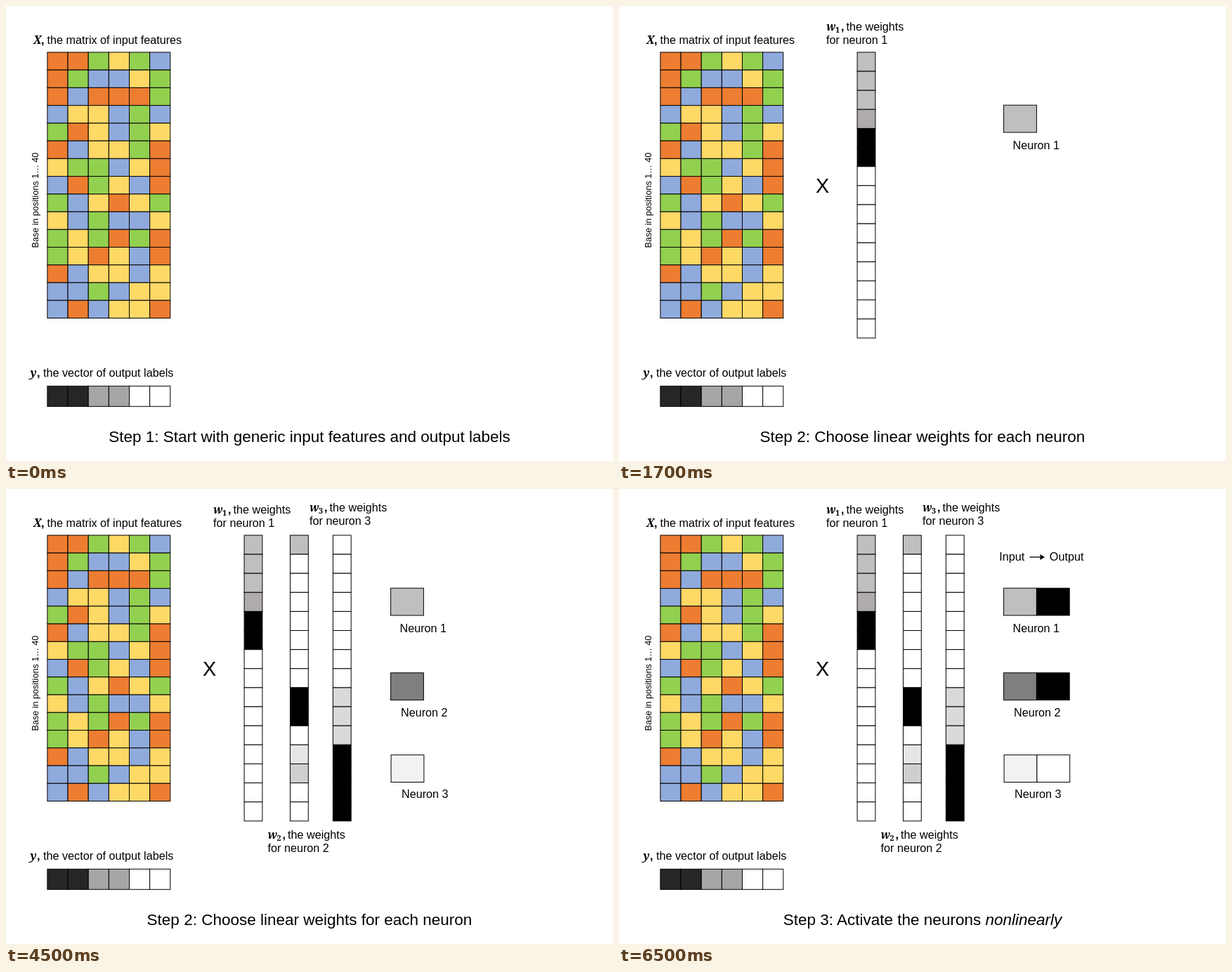
An HTML page for the animation above (8000 ms loop, 864 px wide and 648 px high).

```html
<!DOCTYPE html>
<html lang="en">
<head>
<meta charset="utf-8">
<title>Neuron weights, step by step</title>
<style>
html, body { margin: 0; width: 100%; height: 100%; overflow: hidden; background: #fff; }
svg { display: block; width: 864px; height: 648px; }
text { font: 16.2px "Liberation Sans", Arial, sans-serif; white-space: pre; }
rect { stroke: #000; }
.var { font: italic bold 15.5px "Noto Serif", serif; }
.sub { font: bold 11px "Noto Serif", serif; }
.bold { font-weight: bold; }
.side { font-size: 12.6px; }
.times { font-size: 28.8px; }
.step { font-size: 22.5px; text-anchor: middle; }
</style>
</head>
<body>
<svg id="stage" viewBox="0 0 864 648"></svg>
<script>
const LOOP = 8000;
const stage = document.getElementById('stage');
const scenes = [];
let layer;

function add(tag, attrs, parent = layer) {
  const el = document.createElementNS('http://www.w3.org/2000/svg', tag);
  for (const key in attrs) el.setAttribute(key, attrs[key]);
  return parent.appendChild(el);
}

// Everything drawn after this call is visible from start to end.
function scene(start, end = LOOP) {
  layer = add('g', {}, stage);
  scenes.push({ el: layer, start, end });
}

function text(x, y, str, cls = '') {
  const el = add('text', { x, y, class: cls });
  el.textContent = str;
  return el;
}

function grid(x, y, width, height, rows) {
  rows.forEach((row, r) => row.forEach((fill, c) =>
    add('rect', { x: x + c * width, y: y + r * height, width, height, fill })));
}

function variable(x, y, name, index, commaX, restX, rest) {
  text(x, y, name, 'var');
  if (index) text(x + 13, y + 3, index, 'sub');
  text(commaX, y, ',', 'bold');
  text(restX, y, rest);
}

const shades = {
  O: '#ed7d31', G: '#92d050', Y: '#ffd966', B: '#8faadc',
  k: '#000', d: '#262626', m: '#a6a6a6', w: '#fff',
  a: '#bfbfbf', b: '#afabab', c: '#d9d9d9', e: '#e7e6e6', f: '#d0cece',
  h: '#7f7f7f', i: '#f2f2f2'
};
const paint = str => [...str].map(ch => shades[ch]);

function weights(x, cells, labelX, labelY, n) {
  grid(x, 65.9, 25.8, 27.13, paint(cells).map(fill => [fill]));
  variable(labelX, labelY, 'w', n, labelX + 21, labelX + 28.5, 'the weights');
  text(labelX, labelY + 19, 'for neuron ' + n);
}

const box = (x, y, shade) => grid(x, y, 46.8, 38.8, [paint(shade)]);

function neuron(x, y, shade, labelX, labelY, n) {
  box(x, y, shade);
  text(labelX, labelY, 'Neuron ' + n);
}

const step = str => text(432, 620.5, str, 'step');

scene(0);
variable(39, 54, 'X', '', 50, 58.5, 'the matrix of input features');
grid(58.9, 65.9, 29.15, 25.24, (
  'OOGYGB OGBBYG OBOOOG BYYBGB GOYBGY OBYYGO YGGBYO BOGYBO ' +
  'GBYOYG YBGBBY GYGOGO GYOYBO OBYYBY BBGBYY BOBYYO'
).split(' ').map(paint));
text(0, 0, 'Base in positions 1… 40', 'side')
  .setAttribute('transform', 'translate(46 344.5) rotate(-90)');
variable(34.5, 528, 'y', '', 44, 53, 'the vector of output labels');
grid(58.9, 541.3, 29.15, 29, [paint('ddmmww')]);

scene(0, 500);
step('Step 1: Start with generic input features and output labels');

scene(500, 6500);
step('Step 2: Choose linear weights for each neuron');

scene(500);
text(280, 266, 'X', 'times');
weights(339.1, 'aaabkkwwwwwwwww', 295, 35, 1);
neuron(547.6, 141.2, 'a', 560.5, 204, 1);

scene(2500);
weights(404.5, 'awwwwwwwkkwefww', 372.5, 498, 2);
neuron(547.6, 261.8, 'h', 562, 324, 2);

scene(4500);
weights(465.4, 'wwwwwwwwccckkkk', 432, 32, 3);
neuron(548.1, 378.7, 'i', 563, 439.5, 3);

scene(6500);
text(541.3, 102, 'Input');
text(612.8, 102, 'Output');
add('path', { d: 'M584.5 97H602', stroke: '#000', 'stroke-width': 1.3 });
add('path', { d: 'M599.5 93L606 97L599.5 101Z' });
box(594.4, 141.2, 'k');
box(594.4, 261.8, 'k');
box(594.9, 378.7, 'w');
const last = step('Step 3: Activate the neurons ');
add('tspan', { 'font-style': 'italic' }, last).textContent = 'nonlinearly';

function draw(now) {
  const t = now % LOOP;
  for (const { el, start, end } of scenes)
    el.style.display = t >= start && t < end ? '' : 'none';
}

const origin = performance.now();
function tick() {
  draw(performance.now() - origin);
  requestAnimationFrame(tick);
}
tick();
</script>
</body>
</html>
```
